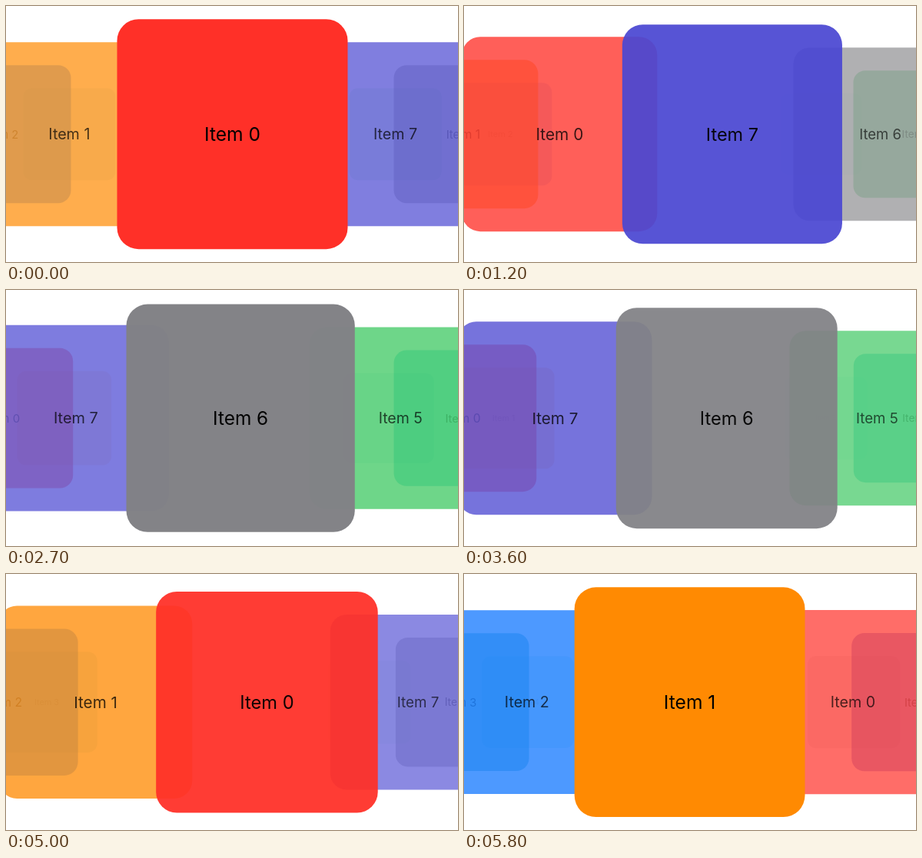
Recreate the animation shown at these times as an HTML page. Size 588x334 px, loop 5900 ms.

```html
<!DOCTYPE html>
<html lang="en">
<head>
<meta charset="utf-8">
<title>Looping carousel</title>
<style>
  html, body { margin: 0; width: 100%; height: 100%; overflow: hidden; background: #fff; }
  svg { display: block; width: 588px; height: 334px; }
  text { font: 400 24.6px Inter, Roboto, sans-serif; text-anchor: middle; }
</style>
</head>
<body>
<svg id="stage" viewBox="0 0 588 334"></svg>
<script>
const NS = 'http://www.w3.org/2000/svg';
const LOOP = 5900;
const CENTER = { x: 294.5, y: 167.2 };
const SIZE = 300;
const RADIUS = 300;
const COLORS = ['#ff3028', '#ff8a02', '#006eff', '#2aa9c2',
                '#10c3bb', '#2cc354', '#828286', '#4b48d2'];
const COUNT = COLORS.length;

// Each swipe drags from one item by an amount, then springs to another item.
const SWIPES = [
  { start: 450, release: 1250, from: 0, by: -0.805, to: -1 },
  { start: 1750, release: 2400, from: -1, by: -0.68, to: -2 },
  { start: 3500, release: 3936, from: -2, by: 0.8, to: 0 },
  { start: 4900, release: 5200, from: 0, by: 0.527, to: 1 }
];

const stage = document.getElementById('stage');

function add(parent, tag, attrs = {}) {
  const node = document.createElementNS(NS, tag);
  for (const key in attrs) node.setAttribute(key, attrs[key]);
  return parent.appendChild(node);
}

const cards = COLORS.map((fill, id) => {
  const group = add(stage, 'g');
  add(group, 'rect', {
    x: -SIZE / 2, y: -SIZE / 2, width: SIZE, height: SIZE, rx: 28, fill
  });
  add(group, 'text', { y: 9 }).textContent = 'Item ' + id;
  return { id, group };
});

const mix = (a, b, k) => a + (b - a) * k;

// Signed distance on the ring, within half a turn.
function distance(id, position) {
  const d = position - id;
  return d - COUNT * Math.round(d / COUNT);
}

function pose(id, position) {
  const d = distance(id, position);
  const far = Math.abs(d);
  return {
    x: Math.sin(d * 2 * Math.PI / COUNT) * RADIUS,
    scale: 1 - far * 0.2,
    opacity: 1 - far * 0.3,
    far
  };
}

// Critically damped spring from 0 to 1.
function spring(ms) {
  const w = 2 * Math.PI * ms / 550;
  return 1 - (1 + w) * Math.exp(-w);
}

function stateAt(t) {
  const swipe = SWIPES.filter(s => t >= s.start).pop();
  if (!swipe) return { a: 0, b: 0, k: 1 };
  const { start, release, from, by, to } = swipe;
  if (t < release) {
    const u = (t - start) / (release - start);
    const p = from + by * (1 - Math.pow(1 - u, 1.1));
    return { a: p, b: p, k: 1 };
  }
  return { a: from + by, b: to, k: spring(t - release) };
}

let lastOrder = '';

function draw(t) {
  const { a, b, k } = stateAt(t);
  for (const card of cards) {
    const from = pose(card.id, a);
    const to = pose(card.id, b);
    const x = CENTER.x + mix(from.x, to.x, k);
    const scale = mix(from.scale, to.scale, k);
    const opacity = Math.max(0, mix(from.opacity, to.opacity, k));
    card.far = to.far;
    card.group.setAttribute('transform', `translate(${x} ${CENTER.y}) scale(${scale})`);
    for (const part of card.group.children) part.setAttribute('opacity', opacity);
  }
  const sorted = [...cards].sort((m, n) => n.far - m.far || m.id - n.id);
  const order = sorted.map(c => c.id).join();
  if (order !== lastOrder) {
    sorted.forEach(c => stage.appendChild(c.group));
    lastOrder = order;
  }
}

function tick() {
  draw(performance.now() % LOOP);
  requestAnimationFrame(tick);
}
tick();
</script>
</body>
</html>
```
